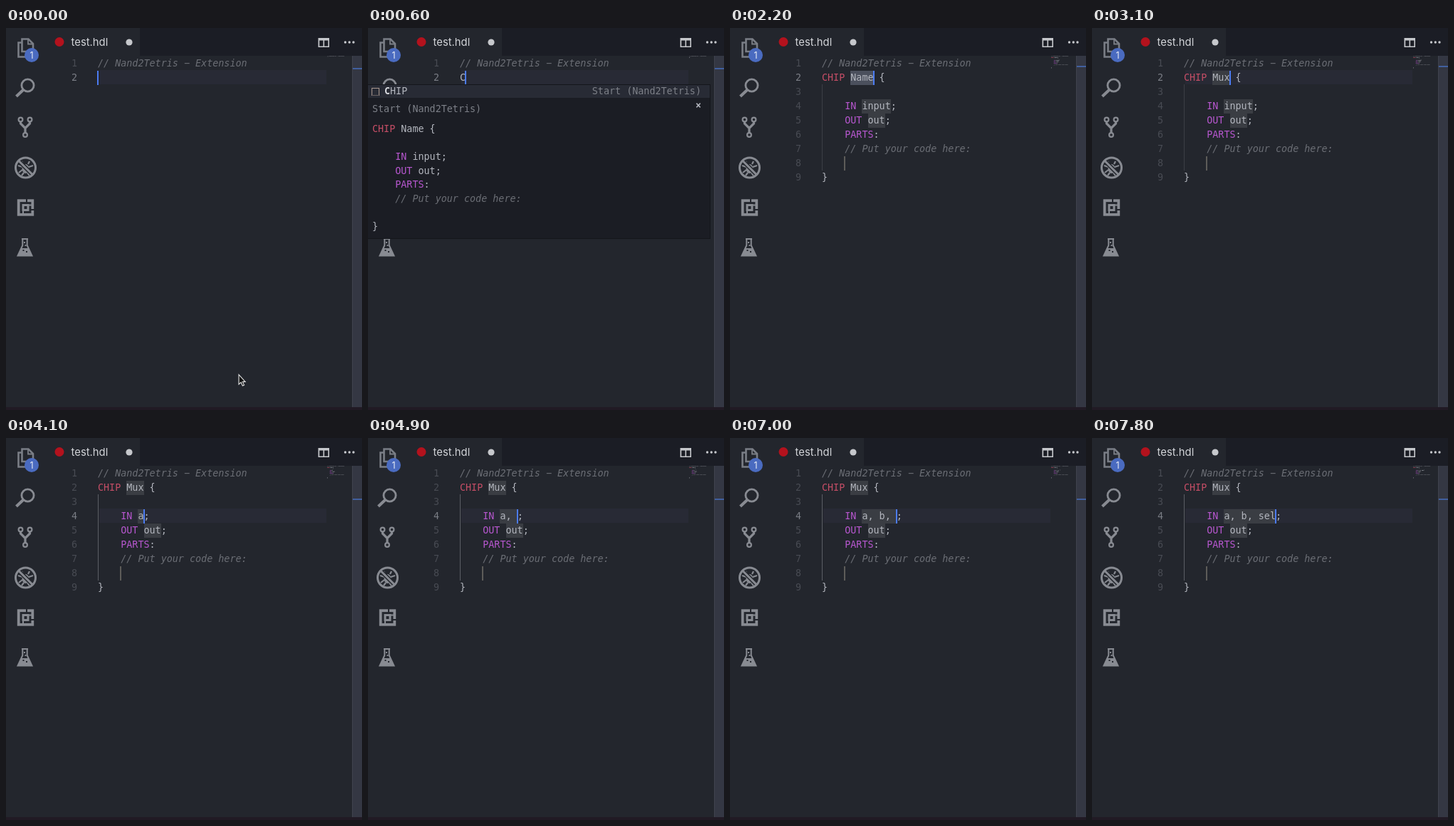
These frames come from a looping animation (500x536 px, 8000 ms). An HTML page:

```html
<!DOCTYPE html>
<html lang="en">
<head>
<meta charset="utf-8">
<title>HDL snippet demo</title>
<style>
  html, body { margin: 0; width: 100%; height: 100%; overflow: hidden; background: #23262d; }
  #stage { position: relative; width: 500px; height: 536px; overflow: hidden; background: #23262d; }
  #stage > *, .line, .nums b { position: absolute; }
  #stage, .row { font: 13.4px/20.06px "DejaVu Sans Mono", "Noto Sans Mono", monospace; color: #b3b6be; }
  svg { left: 0; top: 0; }
  .tabs { left: 188px; top: 0; width: 312px; height: 39px; background: #1b1d25; }
  .file { left: 91.6px; top: 10px; font: 14.8px/20px Inter, "Open Sans", sans-serif; color: #d2d4d8; }
  .ruler { left: 486px; top: 39px; width: 13px; height: 493px; background: #343743; border-left: 1px solid #40434d; }
  .mark { left: 487px; width: 13px; height: 2px; background: #41609f; }
  .foot { left: 0; top: 532px; width: 500px; height: 4px; background: #211a24; }
  .hl { left: 131px; width: 319px; height: 20px; background: #282a35; }
  .guide { left: 129px; top: 79px; width: 1px; height: 121px; background: #3b3e45; }
  .guide.on { background: #5b5e65; }
  .nums { left: 60px; top: 39.6px; }
  .nums b { width: 40px; text-align: right; font-weight: normal; color: #484b53; }
  .nums b.on { color: #7b7e86; }
  .code { left: 129px; top: 39.6px; }
  .line { left: 0; white-space: pre; }
  .key { color: #c54e66; }
  .io { color: #b757cf; }
  .note { color: #6b6e75; font-style: italic; }
  .slot { display: inline-block; background: #3a3d43; }
  .slot.sel { background: #4b505d; }
  .end, .caret { position: absolute; height: 20px; margin-left: -.8px; }
  .end { width: 1.5px; background: #5d5c59; }
  .caret { width: 2px; background: #4c7cf3; }
  .mini { left: 451px; top: 38.7px; transform: scale(.115, .1); transform-origin: 0 0; opacity: .7; -webkit-text-stroke: 2px; }
  .mini .slot, .mini .sel, .pop .slot { background: none; }
  .mini .caret, .mini .end, .pop .end { display: none; }
  .pop { left: -1px; top: 79px; width: 480px; height: 215px; background: #1b1d24; border: 1px solid #14161b; }
  .pop > * { position: absolute; white-space: pre; }
  .row { left: 0; top: 0; width: 480px; height: 18px; line-height: 18px; background: #282b35; }
  .row span { position: absolute; top: 0; left: 23px; }
  .row b { color: #d5d7dc; }
  .row .info { left: auto; right: 12px; color: #7d8088; }
  .snip { position: absolute; left: 5px; top: 4px; width: 9px; height: 9px; border: 1.5px solid #a9988f; border-bottom-style: dotted; }
  .doc { left: 6px; top: 24px; color: #7d8088; }
  .close { left: 460px; top: 19px; color: #b3b6be; font-weight: bold; }
  .body { left: 6px; top: 52px; line-height: 19.5px; }
</style>
</head>
<body>
<div id="stage">
  <div class="tabs"></div>
  <div class="hl" id="hl"></div>
  <div class="guide" id="guide"></div>
  <div class="nums" id="nums"></div>
  <div class="code" id="code"></div>
  <div class="code mini" id="mini"></div>
  <div class="ruler"></div>
  <div class="mark" id="mark"></div>
  <div class="foot"></div>
  <svg width="500" height="536" fill="none" stroke="#888b92" stroke-width="2.6">
    <g stroke="#7a7e86">
      <path d="M22.5 33V15.5H31.5L38 22V33Z"/>
      <path d="M31 15.5V22.5H38" stroke-width="1.8"/>
      <path d="M22 20.5H17.5V40.5H32V36"/>
    </g>
    <circle cx="36" cy="38" r="10" fill="#4a6bc0" stroke="none"/>
    <circle cx="30.5" cy="80.5" r="8.6" stroke-width="2.8"/>
    <path d="M24 87L14.5 96" stroke-width="4"/>
    <g stroke-width="2.2">
      <circle cx="20.5" cy="128.5" r="2.9"/><circle cx="33.5" cy="128.5" r="2.9"/><circle cx="27" cy="150" r="2.9"/>
      <path d="M20.5 131.5V134L27 140.5V147M33.5 131.5V134L27 140.5" stroke-width="3.2"/>
    </g>
    <ellipse cx="27.5" cy="197.5" rx="5" ry="6.5" fill="#888b92" stroke="none"/>
    <path d="M24 191L22 187M31 191L33 187M23 195L17 193M32 195L38 193M23 199L18 203M32 199L37 203M25 203L22 207M30 203L33 207" stroke-width="2.2"/>
    <path d="M17 185.5L38 206.5" stroke="#23262d" stroke-width="6"/>
    <path d="M17 185.5L38 206.5" stroke-width="3"/>
    <circle cx="27.5" cy="196" r="14" stroke-width="3"/>
    <rect x="17.7" y="242.2" width="19.6" height="19.6" stroke-width="3.8"/>
    <path d="M29 239V245M35 255H40" stroke="#23262d" stroke-width="2"/>
    <rect x="24" y="248.5" width="7" height="7" stroke-width="3"/>
    <path d="M31 248.5H36M24 255.5V261" stroke-width="2"/>
    <path d="M22 296H31M23.3 296V305L16.5 319.5H36.5L29.7 305V296" stroke-width="2"/>
    <path d="M21.5 309H31.5L36.5 319.5H16.5Z" fill="#888b92" stroke="none"/>
    <path d="M25 301H27M26.5 305H28.5" stroke-width="1.8"/>
    <path d="M23.5 312H25.5M28 314H30" stroke="#23262d" stroke-width="1.8"/>
    <circle cx="75" cy="19.5" r="6.5" fill="#b3121d" stroke="none"/>
    <g fill="#c6c8cc" stroke="none">
      <circle cx="173" cy="20" r="4.6"/>
      <circle cx="476.5" cy="20" r="1.7"/><circle cx="482.3" cy="20" r="1.7"/><circle cx="488" cy="20" r="1.7"/>
      <path d="M438.5 14H454V27H438.5ZM440.2 17.5V25.5H445.5V17.5ZM447.1 17.5V25.5H452.4V17.5Z" fill-rule="evenodd"/>
    </g>
    <text x="36" y="42.5" text-anchor="middle" fill="#e6eaf5" stroke="none" style="font:12.5px Inter,sans-serif">1</text>
    <path id="pointer" d="M327 486.5V500L330.1 497.2L332.3 502.1L334.5 501.1L332.3 496.4H336.1Z" fill="#111" stroke="#e4e4e4" stroke-width="1.1"/>
  </svg>
  <div class="file">test.hdl</div>
  <div class="pop" id="pop">
    <div class="row"><i class="snip"></i><span id="match"></span><span class="info">Start (Nand2Tetris)</span></div>
    <div class="doc">Start (Nand2Tetris)</div>
    <div class="close">×</div>
    <div class="body" id="body"></div>
  </div>
</div>
<script>
const LOOP = 8000, PITCH = 20.06;
const $ = id => document.getElementById(id);
const span = (cls, text) => `<span class="${cls}">${text}</span>`;
const CARET = '<i class="caret"></i>';

// time, mode, typed text, caret visible
const steps = [
  [0, 'type', '', 1], [200, 'type', '', 0], [500, 'type', 'C', 1],
  [600, 'pop', 'C', 1], [700, 'pop', 'CH', 1], [1200, 'pop', 'CH', 0],
  [1300, 'name', 'Name', 1], [1700, 'name', 'Name', 0], [2200, 'name', 'Name', 1],
  [2500, 'name', 'M', 1], [2800, 'name', 'Mu', 1], [2900, 'name', 'Mux', 1],
  [3300, 'pins', 'input', 1], [3800, 'pins', 'input', 0],
  [4100, 'pins', 'a', 1], [4500, 'pins', 'a,', 1], [4900, 'pins', 'a, ', 1],
  [5400, 'pins', 'a, ', 0], [5900, 'pins', 'a, ', 1],
  [6400, 'pins', 'a, b', 1], [6600, 'pins', 'a, b,', 1], [7000, 'pins', 'a, b, ', 1],
  [7400, 'pins', 'a, b, s', 1], [7600, 'pins', 'a, b, se', 1], [7800, 'pins', 'a, b, sel', 1]
];

const chip = (name, pins) => [
  `${span('key', 'CHIP')} ${name} {`,
  '',
  `    ${span('io', 'IN')} ${pins};`,
  `    ${span('io', 'OUT')} ${span('slot', 'out')};`,
  `    ${span('io', 'PARTS')}:`,
  '    ' + span('note', '// Put your code here:'),
  '    <i class="end"></i>',
  '}'
];

const layout = (lines, pitch) =>
  lines.map((s, i) => `<div class="line" style="top:${i * pitch}px">${s}</div>`).join('');

function show([, mode, text, on]) {
  const caret = on ? CARET : '';
  const snippet = mode === 'name' || mode === 'pins';
  const selected = text === 'Name' || text === 'input';
  const active = mode === 'pins' ? 4 : 2;
  const edit = span(selected ? 'slot sel' : 'slot', text) + caret;
  const rest = !snippet ? [text + caret]
    : mode === 'name' ? chip(edit, span('slot', 'input'))
    : chip(span('slot', 'Mux'), edit);
  const lines = [span('note', '// Nand2Tetris − Extension'), ...rest];

  $('code').innerHTML = $('mini').innerHTML = layout(lines, PITCH);
  $('nums').innerHTML = lines.map((_, i) =>
    `<b class="${i + 1 === active ? 'on' : ''}" style="top:${i * PITCH}px">${i + 1}</b>`).join('');
  $('hl').style.top = 39 + (active - 1) * PITCH + 'px';
  $('hl').hidden = selected;
  $('guide').hidden = !snippet;
  $('guide').className = mode === 'pins' ? 'guide on' : 'guide';
  $('mark').style.top = (!snippet ? 56 : mode === 'name' ? 53 : 85) + 'px';
  $('pop').hidden = mode !== 'pop';
  $('match').innerHTML = `<b>${text}</b>${'CHIP'.slice(text.length)}`;
  $('pointer').style.display = mode === 'type' && !text ? '' : 'none';
}

$('body').innerHTML = layout(chip('Name', 'input'), 19.5);

let current;
function tick() {
  const t = performance.now() % LOOP;
  const step = steps.findLast(s => s[0] <= t);
  if (step !== current) show(current = step);
  requestAnimationFrame(tick);
}
tick();
</script>
</body>
</html>
```
